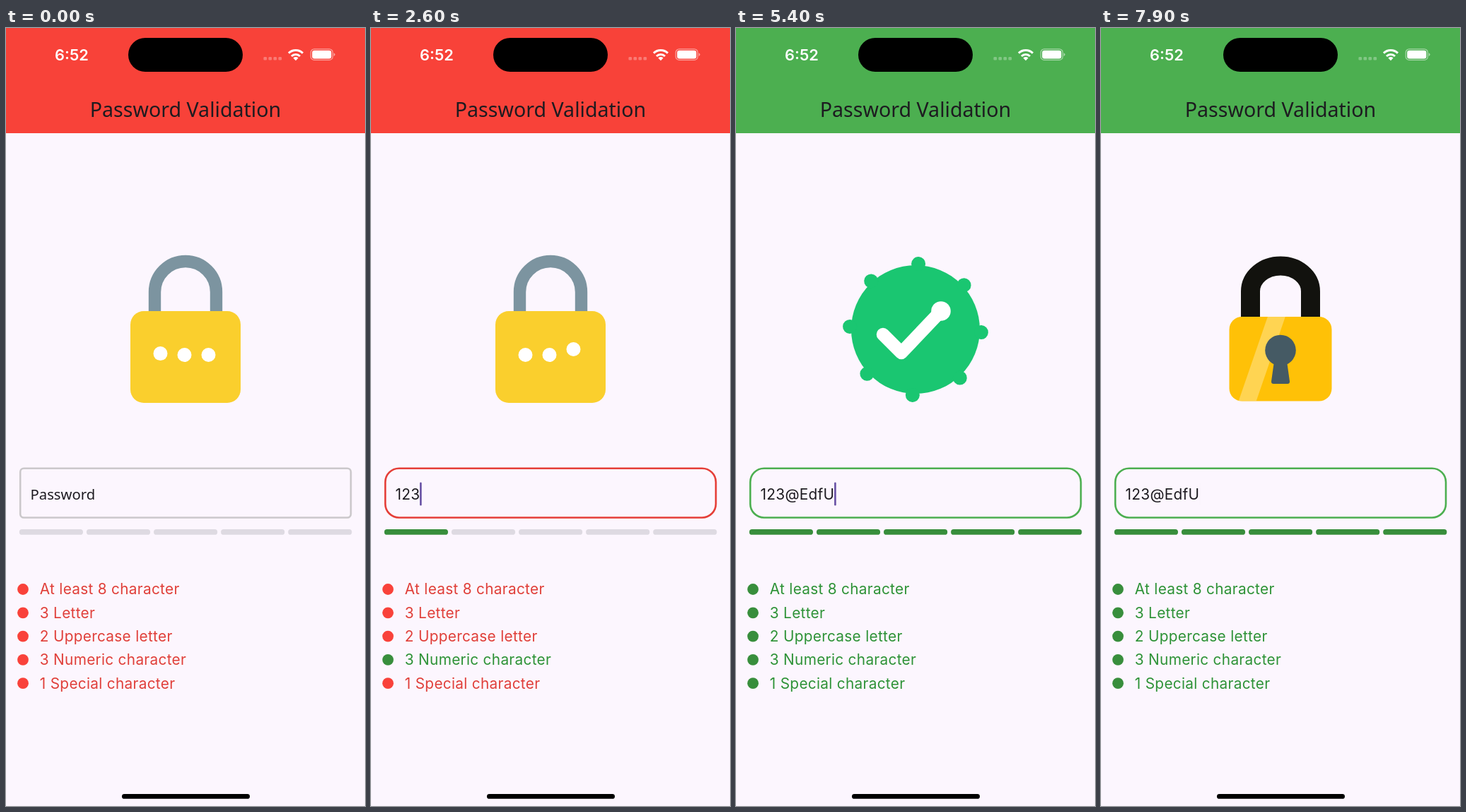
An HTML page for the animation above (8 s loop, 508 px wide and 1102 px high).

```html
<!DOCTYPE html>
<html lang="en">
<head>
<meta charset="utf-8">
<title>Password Validation</title>
<style>
  html, body { margin: 0; width: 100%; height: 100%; overflow: hidden; background: #fcf6fe; }
  svg { display: block; width: 100%; height: 100%; }
  text { white-space: pre; }
  .ui { font: 400 20.8px Inter, Roboto, sans-serif; letter-spacing: .3px; }
  .round { font-family: "Noto Sans", "Open Sans", sans-serif; fill: #1d1b20; }
</style>
</head>
<body>
<svg viewBox="0 0 508 1102">
  <rect width="508" height="1102" fill="#fcf6fe"/>
  <rect id="header" width="508" height="149"/>

  <text x="69" y="46" fill="#fff" style="font:600 21.8px Inter,Roboto,sans-serif">6:52</text>
  <rect x="173" y="14" width="162" height="48" rx="24"/>
  <g fill="#fff">
    <g id="signal" opacity=".3"></g>
    <path d="M410 46.3l-3.6-3.7a5.1 5.1 0 0 1 7.2 0z"/>
    <g fill="none" stroke="#fff" stroke-width="3">
      <path d="M404 40a8.6 8.6 0 0 1 12 0"/>
      <path d="M400 35.6a14.4 14.4 0 0 1 20 0"/>
    </g>
    <rect x="433.2" y="31.8" width="27.2" height="11.6" rx="3.2"/>
    <rect x="431.2" y="29.8" width="31.2" height="15.6" rx="5" fill="none" stroke="#fff" stroke-width="1.2" opacity=".5"/>
    <path d="M463.8 35.2q1.8 .6 1.8 2.4t-1.8 2.4z" opacity=".55"/>
  </g>
  <text class="round" x="254" y="125.500" text-anchor="middle" font-size="28.6" font-weight="500">Password Validation</text>

  <g id="locked">
    <path d="M210.5 405V374a43.5 43.5 0 0 1 87 0V405" fill="none" stroke="#7c94a0" stroke-width="17.400"/>
    <rect x="176" y="401" width="156" height="130" rx="19" fill="#facf2d"/>
    <g id="pips" fill="#fff"></g>
  </g>

  <g id="badge" fill="#1ac671">
    <circle cx="254" cy="427" r="91"/>
    <g id="bumps"></g>
    <path id="tick" d="M208 434L234 460L290 401" pathLength="100" fill="none" stroke="#fff" stroke-width="18.500"
      stroke-linecap="round" stroke-linejoin="round" stroke-dasharray="100 200"/>
    <circle id="ball" cx="290" cy="401" fill="#fff"/>
  </g>

  <g id="padlock">
    <path id="shackle" d="M211.500 422V373a42.500 36 0 0 1 85 0V422" fill="none" stroke="#12120e" stroke-width="27"/>
    <clipPath id="clip"><rect id="clipBody" x="181.500" width="145"/></clipPath>
    <rect id="body" x="181.500" width="145" fill="#ffc107"/>
    <g clip-path="url(#clip)">
      <path id="shine" d="M235.500 409H260.500L219.500 528H194.500z" fill="#fff" opacity=".3"/>
    </g>
    <g id="keyhole" fill="#455a64">
      <circle cx="254" cy="456.500" r="21.800"/>
      <path d="M245 472H263L267 500.500Q267.300 504 264 504H244Q240.700 504 241 500.500z"/>
    </g>
  </g>

  <rect id="field" x="20.200" y="623.700" width="467.800" height="69.800" fill="none" stroke-width="2.600"/>
  <text id="hint" class="round" x="34.500" y="667.500" font-size="20.300">Password</text>
  <text id="entry" class="ui" x="34.500" y="667.500" fill="#1d1b20"></text>
  <rect id="cursor" y="643.500" width="2.600" height="33" rx="1.300" fill="#6750a4"/>
  <g id="bars"></g>
  <g id="rules"></g>
  <rect x="164" y="1085" width="181" height="6.800" rx="3.400"/>
</svg>
<script>
const LOOP = 8000, FOCUS = 1000, BADGE = 5050;
const RED = [229, 63, 56], GRAY = [203, 200, 203], GREEN = [76, 175, 80];
const PASSWORD = '123@EdfU';
const KEYS = [1250, 1950, 2300, 2700, 3000, 3290, 4250, BADGE];
const RULES = [
  ['At least 8 character', /.{8}/],
  ['3 Letter', /([a-z].*){3}/i],
  ['2 Uppercase letter', /([A-Z].*){2}/],
  ['3 Numeric character', /(\d.*){3}/],
  ['1 Special character', /[^a-z\d]/i]
];

const $ = id => document.getElementById(id);
const set = (el, attrs) => { for (const k in attrs) el.setAttribute(k, attrs[k]); return el; };
const add = (parent, tag, attrs) =>
  parent.appendChild(set(document.createElementNS('http://www.w3.org/2000/svg', tag), attrs));
const mix = (a, b, p) => a + (b - a) * p;
const ramp = (t, from, to) => Math.min(1, Math.max(0, (t - from) / (to - from)));
const easeOut = p => 1 - (1 - p) ** 3;
const easeBack = p => 1 + 2.7 * (p - 1) ** 3 + 1.7 * (p - 1) ** 2;
const rgb = (a, b, p) => `rgb(${a.map((v, i) => Math.round(mix(v, b[i], p)))})`;
const show = (el, on) => el.setAttribute('visibility', on ? 'visible' : 'hidden');
const scaleAt = (s, y) => `translate(254 ${y}) scale(${s}) translate(-254 ${-y})`;

for (let i = 0; i < 4; i++)
  add($('signal'), 'rect', { x: 364.5 + 7 * i, y: 41, width: 4.6, height: 4.6, rx: 1.3 });
const pips = [0, 1, 2].map(i => add($('pips'), 'circle', { cx: 218.5 + 34 * i, r: 10 }));
for (let i = 0; i < 8; i++)
  add($('bumps'), 'circle', { cx: 254, cy: 334, r: 10, transform: `rotate(${45 * i} 254 427)` });
const bars = RULES.map((_, i) =>
  add($('bars'), 'rect', { x: 18.8 + 95.1 * i, y: 710, width: 90.2, height: 7.8, rx: 3.9 }));
const rules = RULES.map(([label, test], i) => {
  const y = 795 + 33.3 * i;
  const dot = add($('rules'), 'circle', { cx: 24, cy: y, r: 7.9 });
  const text = add($('rules'), 'text', { class: 'ui', x: 47.8, y: y + 7.3 });
  text.textContent = label;
  return { dot, text, test };
});

function drawLocked(t) {
  pips.forEach((pip, i) => {
    const p = ramp((t + 30 - 220 * i + 2000) % 2000, 0, 400);
    set(pip, { cy: 463 - 8 * Math.sin(Math.PI * p) });
  });
}

function drawBadge(t) {
  const size = easeBack(ramp(t, BADGE - 60, 5330)) * (1 - ramp(t, 5950, 6250) ** 2);
  set($('badge'), { transform: scaleAt(size, 427) });
  set($('bumps'), { transform: `rotate(${2.5 + (t - 5400) * 0.03} 254 427)` });
  const drawn = ramp(t, 5180, 5390);
  set($('tick'), { 'stroke-dashoffset': 100 * (1 - drawn) });
  show($('tick'), drawn > 0);
  set($('ball'), { r: mix(13.8, 9.2, ramp(t, 5420, 5600)) });
  show($('ball'), drawn === 1);
}

function drawPadlock(t) {
  const m = easeOut(ramp(t, 7300, 7520));
  const shape = { y: mix(402.5, 409, m), height: mix(122.5, 119.5, m), rx: mix(60, 18, m) };
  set($('body'), shape);
  set($('clipBody'), shape);
  const lift = mix(90, 7.5, easeOut(ramp(t, 6900, 7300)));
  set($('shackle'), { transform: `translate(0 ${mix(lift, 0, m)})` });
  show($('shackle'), t >= 6900);
  set($('keyhole'), { transform: `translate(0 ${mix(-4, 0, m)})` });
  set($('shine'), { transform: `translate(${(t - 7900) * 0.32} 0)` });
  set($('padlock'), { transform: scaleAt(easeOut(ramp(t, 6600, 6950)), 463) });
}

function drawForm(t) {
  const typed = KEYS.filter(k => k <= t);
  const value = PASSWORD.slice(0, typed.length);
  const valid = t >= BADGE;
  const focus = ramp(t, FOCUS, FOCUS + 167);
  set($('header'), { fill: valid ? '#4caf50' : '#f84239' });
  set($('field'), {
    rx: mix(5, 19.5, focus),
    stroke: valid ? rgb(RED, GREEN, ramp(t, BADGE, BADGE + 167)) : rgb(GRAY, RED, focus)
  });

  show($('hint'), !value);
  const entry = $('entry');
  if (entry.textContent !== value) entry.textContent = value;
  const phase = (t - (typed.length ? typed[typed.length - 1] : FOCUS)) % 1000;
  set($('cursor'), {
    x: 34.2 + (value ? entry.getComputedTextLength() : 0),
    opacity: t < FOCUS ? 0 : 1 - ramp(phase, 500, 650) + ramp(phase, 850, 1000)
  });

  let passed = 0;
  for (const { dot, text, test } of rules) {
    const ok = test.test(value);
    passed += ok;
    set(dot, { fill: ok ? '#388e3c' : '#f9423a' });
    set(text, { fill: ok ? '#2d9236' : '#e03f39' });
  }
  bars.forEach((bar, i) => set(bar, { fill: i < passed ? '#388e3c' : '#dedae2' }));
}

function draw(t) {
  show($('locked'), t < BADGE);
  $('badge').style.display = t >= BADGE && t < 6250 ? '' : 'none';
  $('padlock').style.display = t > 6600 ? '' : 'none';
  drawLocked(t);
  drawBadge(t);
  drawPadlock(t);
  drawForm(t);
}

const start = performance.now();
function tick() {
  draw((performance.now() - start) % LOOP);
  requestAnimationFrame(tick);
}
tick();
</script>
</body>
</html>
```
